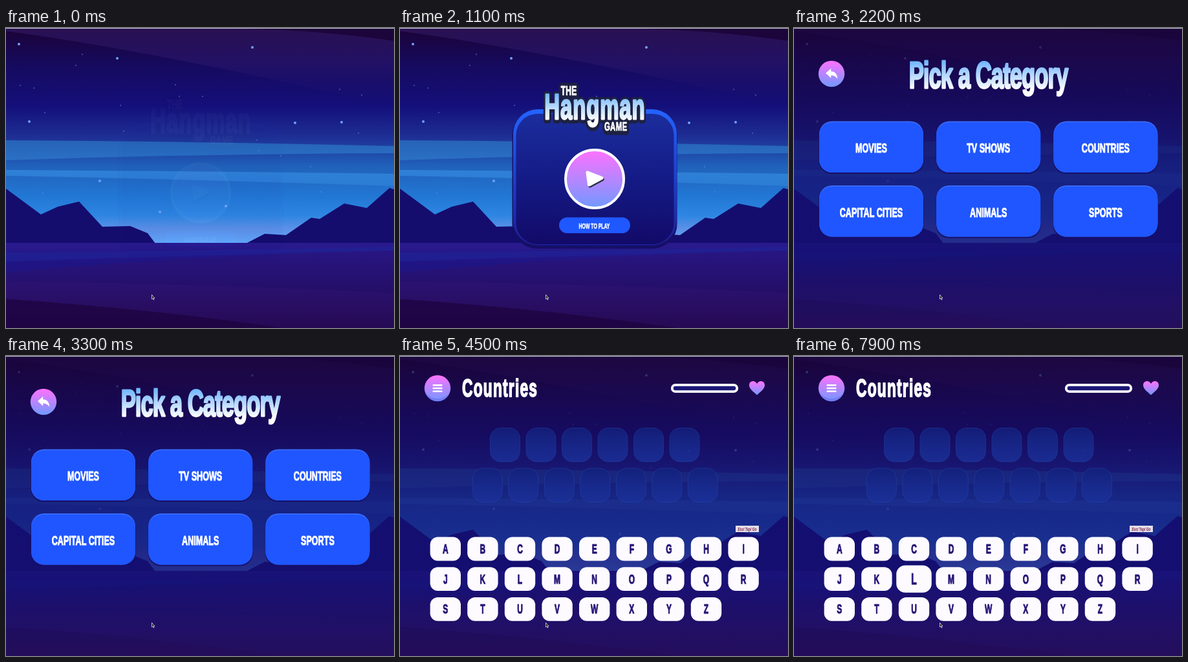
Write an HTML page that moves like this. It is 600 px wide and 465 px high and loops after 8 s.

```html
<!DOCTYPE html>
<html lang="en">
<head>
<meta charset="utf-8">
<title>The Hangman Game</title>
<style>
  html, body { margin: 0; width: 100%; height: 100%; overflow: hidden; background: #1a043a; }
  svg { display: block; width: 600px; height: 465px; }
  text { font: bold 19px "Liberation Sans", Arial, sans-serif; stroke-linejoin: round; }
</style>
</head>
<body>
<svg id="stage" viewBox="0 0 600 465" xmlns="http://www.w3.org/2000/svg">
  <defs id="defs"></defs>
  <g id="scene"></g>
  <rect id="shade" width="600" height="465" fill="url(#shadeFill)"/>
  <g id="menu"></g>
  <g id="picker"></g>
  <g id="game"></g>
  <path fill="#111" stroke="#e8e8f4" stroke-width=".8" d="M225.5 413.5v6.6l1.5-1.2 1.1 2.4 1-.5-1-2.3h1.7z"/>
  <rect width="600" height="1" fill="#c9c7d2"/>
</svg>
<script>
const NS = "http://www.w3.org/2000/svg";
const $ = id => document.getElementById(id);

function add(parent, tag, attrs = {}, text) {
  const el = document.createElementNS(NS, tag);
  for (const k in attrs) el.setAttribute(k, attrs[k]);
  if (text) el.textContent = text;
  parent.appendChild(el);
  return el;
}
const path = (g, d, fill, extra) => add(g, "path", { d, fill, ...extra });
const box = (g, x, y, width, height, rx, fill, extra) =>
  add(g, "rect", { x, y, width, height, rx, fill, ...extra });
const disc = (g, cx, cy, r, fill, extra) => add(g, "circle", { cx, cy, r, fill, ...extra });

// All lettering shares one condensed, heavy style.
const condensed = (x, y) => `translate(${x} ${y}) scale(.6 1)`;
function label(g, str, x, y, size,
    { gap = 0, anchor = "middle", fill = "#fff", weight = size * .05, slant = "normal" } = {}) {
  const shift = anchor === "middle" ? gap * .3 : 0;
  return add(g, "text", {
    transform: condensed(x + shift, y),
    style: `font-size:${size}px;letter-spacing:${gap}px;font-style:${slant}`,
    "text-anchor": anchor, fill, stroke: fill, "stroke-width": weight
  }, str);
}

// Vertical gradients: alternating offset and colour.
function gradient(id, ...stops) {
  const g = add($("defs"), "linearGradient", { id, x1: 0, y1: 0, x2: 0, y2: 1 });
  for (let i = 0; i < stops.length; i += 2)
    add(g, "stop", { offset: stops[i], "stop-color": stops[i + 1] });
}
gradient("sky", 0, "#1c0337", .17, "#160a5e", .36, "#140f7a", .51, "#1e3095", .64, "#2061ba",
  .78, "#2277d4", .87, "#2e86e2", .93, "#5c90e8", 1, "#62aafc");
gradient("veil", 0, "#2c1458cc", .45, "#2a166c99", 1, "#1a0f7000");
gradient("bandA", 0, "#2763b8", 1, "#2a70c4");
gradient("bandB", 0, "#2f80d6", 1, "#2b7cd4");
gradient("ground", 0, "#2a1a8e", .25, "#1f1484", .6, "#271170", 1, "#200544");
gradient("mid", 0, "#281682", 1, "#240e66");
gradient("low", 0, "#2b1272", 1, "#260a54");
gradient("shadeFill", 0, "#1a043a", .5, "#130f72", .75, "#140f70", 1, "#24105f");
gradient("pink", 0, "#fe71fe", 1, "#7199ff");
gradient("ice", .12, "#67b0ff", .85, "#ffffff");
gradient("panel", 0, "#1b2d9c", .5, "#141b86", 1, "#120a68");
gradient("rim", 0, "#2463ff", .25, "#2050e4", 1, "#1c1c92");
gradient("slot", 0, "#13207c", .5, "#182a8c", 1, "#1b3098");

function buildScene(g) {
  box(g, 0, 0, 600, 334, 0, "url(#sky)");
  path(g, "M0 5Q150 24 400 77Q500 98 600 123V0H0Z", "url(#veil)");
  path(g, "M330 0Q480 2 600 20V0Z", "#180233", { opacity: .75 });
  path(g, "M0 174Q300 176 600 183V194Q300 195 0 205Z", "url(#bandA)");
  path(g, "M0 220Q300 222 600 226V245Q300 235 0 229Z", "url(#bandB)");

  const bright = [[20, 25], [172, 47], [381, 30], [36, 145], [447, 147], [519, 146],
    [145, 237], [238, 285], [340, 276]];
  const faint = [[118, 41], [108, 58], [22, 89], [43, 93], [60, 131], [177, 120], [262, 88],
    [268, 106], [304, 106], [182, 160], [516, 95], [550, 104], [388, 174], [391, 190],
    [425, 198], [471, 215], [545, 163], [487, 254], [57, 256]];
  bright.forEach(([x, y]) => disc(g, x, y, 2, "#70a2f6"));
  faint.forEach(([x, y]) => disc(g, x, y, .8, "#6a94e6"));

  path(g, "M0 249L54 289L80 277L113 269L149 308L192 307L219 318L231 334H0Z", "#140d6e");
  path(g, "M371 334L400 319L433 321L472 294L485 296L523 272L558 279L593 248L600 250V334Z", "#140d6e");

  box(g, 0, 333, 600, 132, 0, "url(#ground)");
  path(g, "M0 348Q300 346 600 339V345Q300 352 0 362Z", "#1f269a", { opacity: .5 });
  path(g, "M0 380Q250 353 600 345V411Q300 396 0 393Z", "url(#mid)");
  path(g, "M0 393Q300 396 600 411V465H0Z", "url(#low)");
  path(g, "M0 420Q230 436 430 465H0Z", "#1e0442", { opacity: .8 });
}

function buildMenu(g) {
  box(g, 173.5, 128, 255, 214, 38, "#150f66");
  box(g, 175, 126, 253, 211, 38, "url(#rim)");
  box(g, 179.5, 133, 244, 202, 33, "url(#panel)");
  const words = [["THE", 261, 104, 20, .5], ["Hangman", 301, 141, 55, 1.4, "url(#ice)"],
    ["GAME", 333.5, 159, 19, .6]];
  words.forEach(([str, x, y, size, gap]) =>
    label(g, str, x, y + 1, size, { gap, fill: "#1d2142", weight: 12 }));
  words.forEach(([str, x, y, size, gap, fill]) => label(g, str, x, y, size, { gap, fill }));

  disc(g, 301, 234, 45, "url(#pink)", { stroke: "#fff", "stroke-width": 4 });
  const play = "M290 224L312 232.5L292.5 243Z";
  const round = { "stroke-width": 5, "stroke-linejoin": "round" };
  path(g, play, "#243041", { ...round, stroke: "#243041", transform: "translate(1.2 2)" });
  path(g, play, "#fff", { ...round, stroke: "#fff" });
  box(g, 245.5, 294, 111, 25.5, 12.7, "#170f72");
  box(g, 246, 293.5, 110, 24.5, 12.2, "#1f58ff");
  label(g, "HOW TO PLAY", 300.5, 310.5, 11.5);
}

function buildPicker(g) {
  const head = add(g, "g");
  disc(head, 58, 71, 20.2, "url(#pink)");
  path(head, "M49 70L57.2 62.8V67.2C63.5 67.2 67 71.5 67.2 79C65 75.2 62 73.4 57.2 73.4V77.4Z", "#fff");
  label(head, "Pick a Category", 301, 93, 58, { gap: -1.7, fill: "url(#ice)" });

  const names = ["MOVIES", "TV SHOWS", "COUNTRIES", "CAPITAL CITIES", "ANIMALS", "SPORTS"];
  const cards = names.map((name, i) => {
    const card = add(g, "g");
    const x = 39 + 181.2 * (i % 3), y = i < 3 ? 145 : 244.5;
    box(card, x - .5, y + 1, 162, 80, 20, "#140e66");
    box(card, x, y - .5, 161, 79.5, 20, "#3a6cff");
    box(card, x, y + 1.2, 161, 77.8, 20, "#1f56ff");
    label(card, name, x + 80.5, y + 48.3, 21);
    return card;
  });
  return { head, cards };
}

function buildGame(g) {
  const head = add(g, "g");
  disc(head, 58, 50, 20.2, "url(#pink)");
  path(head, "M37.8 50a20.2 20.2 0 0 0 40.4 0a20.2 16 0 0 1-40.4 0z", "#6a5ce8", { opacity: .45 });
  [45.2, 50, 54.8].forEach(y => box(head, 50.5, y - 1.2, 15, 2.4, .8, "#fff"));
  label(head, "Countries", 96, 63, 38, { gap: 2, anchor: "start" });
  box(head, 420.8, 44.8, 100.4, 10.4, 5.2, "#1a1676", { stroke: "#fff", "stroke-width": 3.8 });
  path(head, "M552 60.5C546 55 540 51 540 45.3C540 38 549 37 552 43C555 37 564 38 564 45.3C564 51 558 55 552 60.5Z", "url(#pink)");

  const slots = add(g, "g");
  [[6, 139.5, 111.5], [7, 112.3, 174]].forEach(([count, x, y], row) => {
    for (let i = 0; i < count; i++)
      box(slots, x + 55.5 * i, y, 46, 52.5, 16, "url(#slot)",
        { stroke: "#2448a8", "stroke-opacity": .55, opacity: row ? .95 : .85 });
  });

  const board = add(g, "g");
  const tag = box(board, 519, 263, 36, 10, 0, "#e4dce8");
  const note = label(board, "", 537, 270.8, 8, { fill: "#7a2a4a", weight: 0, slant: "italic" });
  const keys = {};
  [..."ABCDEFGHIJKLMNOPQRSTUVWXYZ"].forEach((ch, i) => {
    const x = 70.3 + 57.6 * (i % 9), y = 299 + 46.7 * Math.floor(i / 9);
    const el = add(board, "g");
    box(el, -23.7, -18.4, 47.4, 36.8, 12, "#fdfbff");
    label(el, ch, 0, 7, 20, { fill: "#261676" });
    keys[ch] = { el, x, y };
  });
  return { head, slots, board, keys, tag, note };
}

buildScene($("scene"));
buildMenu($("menu"));
const picker = buildPicker($("picker"));
const game = buildGame($("game"));

const LOOP = 8000;
// Hovered keys: letter, start and end in ms.
const HOVERS = [["F", 4650, 4900], ["N", 4950, 5200], ["U", 5250, 5500], ["T", 5550, 6250],
  ["K", 6350, 6750], ["C", 6850, 7250], ["L", 7400, 8300]];

const ramp = (t, from, to) => Math.min(1, Math.max(0, (t - from) / (to - from)));
const smooth = p => p * p * (3 - 2 * p);
const span = (t, from, to) => smooth(ramp(t, from, to));
const move = (el, x, y) => el.setAttribute("transform", `translate(${x} ${y})`);

function show(el, amount) {
  el.setAttribute("opacity", amount);
  el.style.display = amount > 0 ? "" : "none";
}

function draw(t) {
  const menuIn = .03 + .97 * span(t, 0, 450);
  const menuOut = 1 - span(t, 1110, 1230);
  show($("menu"), menuIn * menuOut);
  move($("menu"), 0, 22 * (1 - menuIn));

  const pick = span(t, 1200, 1400) * (1 - span(t, 3430, 3670));
  show($("picker"), pick);
  move(picker.head, 0, -10 * (1 - pick));
  picker.cards.forEach((card, i) => move(card, (i % 2 ? 6 : -6) * (1 - pick), 0));

  show($("shade"), .8 * span(t, 1120, 1290) - .07 * span(t, 3620, 3800));

  const play = span(t, 3690, 3920);
  show($("game"), play);
  move(game.head, 0, -10 * (1 - play));
  move(game.slots, 0, -9 * (1 - play));
  move(game.board, 0, 9 * (1 - play));

  const short = t < 4000;
  game.tag.setAttribute("x", short ? 540 : 519);
  game.tag.setAttribute("width", short ? 15 : 36);
  game.note.setAttribute("transform", condensed(short ? 547.5 : 537, 270.8));
  game.note.textContent = short ? "Tap" : "Esc/ Tap/ Go";

  const grow = {};
  for (const [ch, from, to] of HOVERS)
    grow[ch] = span(t, from, from + 200) * (1 - span(t, to, to + 200));
  for (const ch in game.keys) {
    const { el, x, y } = game.keys[ch];
    el.setAttribute("transform", `translate(${x} ${y}) scale(${1 + .15 * (grow[ch] || 0)})`);
  }
}

const start = performance.now();
function tick() {
  draw((performance.now() - start) % LOOP);
  requestAnimationFrame(tick);
}
draw(0);
requestAnimationFrame(tick);
</script>
</body>
</html>
```
